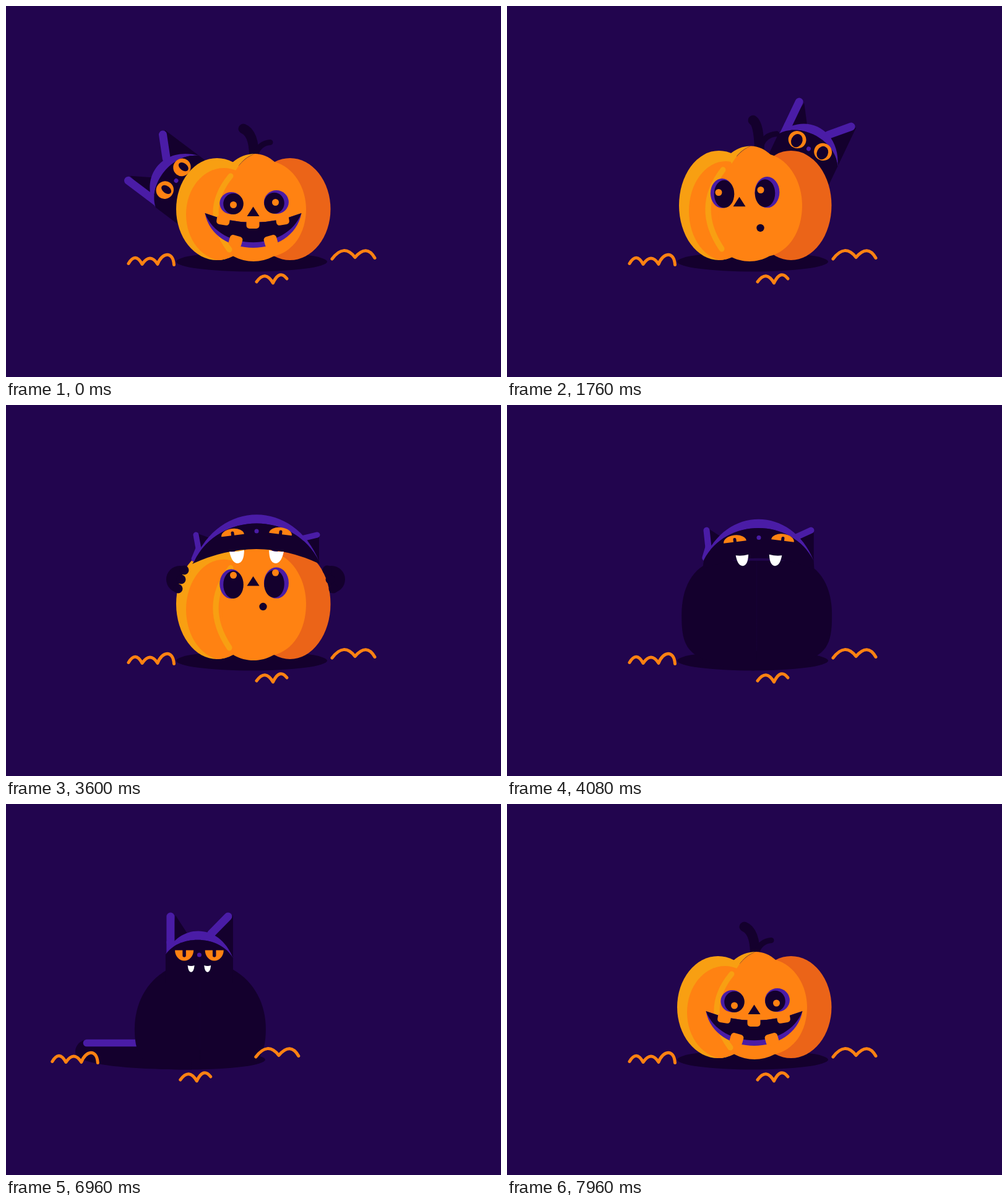
An HTML page with a canvas for the animation above (8 s loop, 800 px wide and 600 px high).

```html
<!DOCTYPE html>
<html lang="en">
<head>
<meta charset="utf-8">
<title>Pumpkin and cat</title>
<style>
html, body { margin: 0; width: 100%; height: 100%; overflow: hidden; background: #22054e; }
canvas { display: block; width: 800px; height: 600px; }
</style>
</head>
<body>
<canvas id="stage" width="800" height="600"></canvas>
<script>
const c = document.getElementById('stage').getContext('2d');
const BG = '#22054e', DARK = '#14002d', PURPLE = '#4a1ca6',
      ORANGE = '#ff8212', YELLOW = '#f89f12', RUST = '#eb6418';
const LOOP = 8000;

// ---------- helpers ----------
const lerp = (a, b, k) => a + (b - a) * k;
const clamp = v => Math.max(0, Math.min(1, v));
const smooth = v => v * v * (3 - 2 * v);

// keys: [time, value]
function track(t, ...keys) {
  if (t <= keys[0][0]) return keys[0][1];
  for (let i = 1; i < keys.length; i++) {
    const [t0, a] = keys[i - 1], [t1, b] = keys[i];
    if (t <= t1) return lerp(a, b, smooth((t - t0) / (t1 - t0)));
  }
  return keys[keys.length - 1][1];
}

// Slow start, long soft stop: cubic-bezier(.778, 0, .337, 1)
function glide(x) {
  let lo = 0, hi = 1;
  for (let i = 0; i < 24; i++) {
    const v = (lo + hi) / 2, w = 1 - v;
    if (3 * v * w * w * 0.778 + 3 * v * v * w * 0.337 + v * v * v < x) lo = v; else hi = v;
  }
  return smooth(lo);
}

function fill(color, d) { c.fillStyle = color; c.fill(new Path2D(d)); }
function line(color, width, d) {
  c.strokeStyle = color; c.lineWidth = width; c.lineCap = c.lineJoin = 'round';
  c.stroke(new Path2D(d));
}
function oval(color, x, y, rx, ry = rx, from = 0, to = 2 * Math.PI) {
  c.fillStyle = color;
  c.beginPath(); c.ellipse(x, y, rx, ry, 0, from, to); c.fill();
}
function at(x, y, rot, draw) {
  c.save(); c.translate(x, y); c.rotate(rot); draw(); c.restore();
}

// ---------- ground ----------
function shadow() { oval(DARK, 397, 413.5, 122, 16); }

function squiggles(dx) {
  at(dx, -0.5, 0, () => {
    line(ORANGE, 5, 'M198 417Q209 398 220 418Q233 399 245 418C252 399 270 396 271.5 419');
    line(ORANGE, 5, 'M405 446.5Q419 427 431.5 448.5Q442 426 454 441.5');
    line(ORANGE, 5, 'M527 409.5Q546 384 564 407Q583 385 596 408');
  });
}

// ---------- pumpkin ----------
function tooth(x, y, rot, w, h) {
  at(x, y, rot, () => {
    c.fillStyle = ORANGE;
    c.beginPath(); c.roundRect(-w / 2, -h / 2, w, h, 5); c.fill();
  });
}

function mouth(x, y, s) {
  if (s < 0.14) return oval(DARK, x, y, 6.2);
  at(x, y, 0, () => {
    c.scale(s, s);
    fill(PURPLE, 'M-78-27Q0 3 78-27C64 47.5-64 47.5-78-27Z');
    fill(DARK, 'M-78-27Q0 3 78-27C54 36-54 36-78-27Z');
    for (const i of [-1, 0, 1]) {
      tooth(48 * i - 0.5, -9.5 - 6 * i * i, -0.16 * i, 21, 15);
      if (i) tooth(28.5 * i, 18.5, -0.28 * i, 21, 18);
    }
  });
}

// lift raises the face, turn is -1 (left) to 1 (right), fear swaps smile for gasp
function pumpkin({ lift, turn, fear, look }, stem = true) {
  const h = 165 + 14 * (1 - Math.exp(-lift / 8));
  if (stem) {
    const sx = -14 * turn, sy = -0.8 * (h - 165) - 4 * Math.abs(turn), b = 402 + sx / 2;
    line(DARK, 16, `M${383.5 + sx} ${198.5 + sy}Q${b} ${206 + sy} ${b - 1} 250`);
    line(DARK, 9, `M${b + 1} ${242 + sy}Q${b + 6} ${222 + sy} ${427 + sx * 0.65} ${220.5 + sy}`);
  }
  c.save();
  c.translate(0, 411); c.scale(1, h / 165); c.translate(0, -411);
  const inL = 1.5 * Math.max(0, -turn), inR = 1.5 * Math.max(0, turn);
  oval(RUST, 459 - inR, 328.5, 65.5 - inR, 82.5);
  oval(YELLOW, 341 + inL, 328.5, 66 - inL, 82.5);
  c.save();
  c.clip();
  oval(ORANGE, 352 + inL, 337, 61 - inL, 75);
  c.restore();
  at(turn * 8, 0, 0, () => {
    fill(ORANGE, 'M371 266Q383 246 402 239C414 239 425 244 434 252C466 261 485 295 485 328' +
      'C485 368 464 398 432 405C412 415.500 388 415.500 368 405C342 385 345 300 371 266Z');
    fill(YELLOW, 'M366 253Q382 239 402 239Q383 245 371 266Z');
  });
  at(turn * 14, 0, 0, () => line(YELLOW, 9, 'M363 275Q316 332 361 394'));
  c.restore();

  const ex = 400.5 + 16.5 * turn, ey = 318 - lift, er = 18.5 + 6 * fear;
  for (const s of [-1, 1]) {
    oval(PURPLE, ex + s * 36.4, ey - s * 0.8, 19.4 + s * 0.6, er + s * 0.6);
    oval(DARK, ex + s * 33, ey + 1.4 - s * 0.6, 16.3, er * 0.92);
    oval(ORANGE, ex + 1 + 9 * turn + s * 34, ey + look - s * 2, 5.5);
  }
  const nx = 399.5 + 24 * turn, ny = 332 - lift * (0.25 + 0.046 * lift);
  fill(DARK, `M${nx} ${ny - 7.5}l10 15.500h-20Z`);
  mouth(399.5 + fear * (16 + 6 * turn), lerp(362 - 0.4 * lift, 398 - 2.44 * lift, fear), 1 - fear);
}

const mood = t => ({
  lift: track(t, [120, 0], [480, 16], [2800, 16], [3080, 29.5], [5000, 29.5], [5100, 12], [7400, 12], [7760, 0]),
  turn: track(t, [120, 0], [480, -1], [1880, -1], [2200, 1], [2800, 1], [3080, 0]),
  fear: track(t, [120, 0], [480, 1], [5000, 1], [5100, 0]),
  look: track(t, [120, 1.5], [480, -2.5], [2800, -2.5], [3080, -15.3], [5000, -15], [5100, -9], [7400, -9], [7760, 6])
});

// ---------- cat ----------
function eyes(mode, pupil) {
  for (const s of [-1, 1]) {
    if (mode === 'round') {
      const [dx, dy, rx, ry] = pupil;
      oval(ORANGE, s * 23, -5.5, 14.5, 14);
      oval(DARK, s * 23 + dx, -5.5 + dy, rx, ry);
    } else if (mode === 'half') {
      oval(ORANGE, s * 24.3, -7.5, 15, 17, 0, Math.PI);
      line(DARK, 5.5, `M${s * 24.3} -9V1`);
    } else {
      at(s * 38.5, 6 - s, s * 0.12, () => {
        oval(ORANGE, 0, 0, 18.5, 11, Math.PI, 2 * Math.PI);
        line(DARK, 5, 'M0 -4V1');
      });
    }
  }
}

// k: 0 upright head, 1 stretched wide over the pumpkin; origin at the nose
function head(x, y, rot, { k = 0, neck = 45, mode = 'round', pupil, fangs = false, flick = 0 }) {
  const w = lerp(54.5, 101, k), low = lerp(2.5, 49, k), tilt = 3 * (1 - k);
  const L = `${-w} ${low - tilt}`, R = `${w} ${low + tilt}`, cx = 0.6 * w;
  const ear = s => {
    const tx = s * lerp(46.5, 98, k), ty = lerp(-62, 6, k);
    const inner = `${s * lerp(19, 73, k)} ${lerp(-34, 12, k)}`;
    const outer = `${s * (w - 8 * (1 - k))} ${low - 4}`;
    const bend = `${s * lerp(46.5, 94, k)} ${lerp(-20, 28, k)}`;
    const edge = s < 0 ? bend : R;
    fill(DARK, `M${tx + lerp(8, 3, k)} ${ty - 2}L${inner}L${edge}Z`);
    line(PURPLE, lerp(13, 9, k), `M${tx} ${ty}L${s < 0 ? bend : inner}`);
    return `M${bend}L${outer}`;
  };
  at(x, y, rot, () => {
    c.save();
    c.translate(-46, -20); c.rotate(flick); c.translate(46, 20);
    const root = ear(-1);
    c.restore();
    line(PURPLE, lerp(13, 9, k), root);
    ear(1);
    fill(PURPLE, `M${L}C${-cx} -52 ${cx} -52 ${R}C${cx} -33 ${-cx} -33 ${L}Z`);
    const jaw = lerp(neck, 53, k);
    fill(DARK, `M${L}C${-cx} -33 ${cx} -33 ${R}L${w + k} ${jaw}Q0 ${lerp(neck, 5, k)} ${-w - 3 * k} ${jaw}Z`);
    eyes(mode, pupil);
    oval(PURPLE, 0, 0, 3.5);
    if (!fangs) return;
    const fw = lerp(5.5, 12, k), fh = lerp(11, 20, k);
    for (const s of [-1, 1]) {
      at(s * lerp(13.3, 32, k), lerp(17, 32, k), s * 0.1 * k, () =>
        fill('#fff', `M${-fw} 0Q0 2 ${fw} 0Q${fw * 0.8} ${fh} 0 ${fh}Q${-fw * 0.8} ${fh} ${-fw} 0Z`));
    }
  });
}

// d: how far the head has sunk back behind the pumpkin
function peek(x, y, deg, d, pupil) {
  if (d > 114) return;
  const r = deg * Math.PI / 180;
  head(x - Math.sin(r) * d, y + Math.cos(r) * d, r, { neck: 75, pupil });
}

// k: 1 as wide as the pumpkin inside, 0 sitting
function body(k, wobble) {
  const b = lerp(106, 127, k) * (1 + wobble), n = lerp(53.5, 70, k),
        top = lerp(268, 246, k), mid = lerp(364, 330, k);
  const half = s => `M0 ${top}H${s * n}C${s * lerp(88, 112, k)} ${top + lerp(20, 4, k)} ${s * b} ${mid - 40} ${s * b} ${mid}` +
    `C${s * b} ${mid + lerp(24, 45, k)} ${s * (b - 4)} 404 ${s * lerp(b - 15, 62, k)} 414H0Z`;
  at(lerp(414, 400, k), 0, 0, () => { fill(DARK, half(-1)); fill(DARK, half(1)); });
}

function tail(k) {
  if (k <= 0) return;
  const x = lerp(312, 212.5, k);
  fill(DARK, `M400 381H${x + 20}C${x + 3} 382 ${x - 2} 396 ${x} 404` +
    `C${x + 6} 421 ${x + 80} 429.500 400 429.500Z`);
  line(PURPLE, 11.5, `M${x + 18} 386.600H330`);
}

function paws(t, front) {
  const out = track(t, [2880, 0], [3120, 1], [3960, 1], [4080, 0]);
  if (out <= 0) return;
  const dx = track(t, [3600, 0], [3800, 15], [4040, -28]);
  const y = track(t, [3600, 282], [4040, 385]);
  for (const s of [-1, 1]) {
    const x = 403.5 + s * (122.5 + dx - (1 - out) * 40);
    if (!front) oval(DARK, x, y, 22);
    else for (const i of [-1, 0, 1]) oval(DARK, x - s * (2 - 5 * i), y + 15 * i, 7.5 * out);
  }
}

// ---------- scenes ----------
function hideAndSeek(t) {
  const jaw = track(t, [3320, 0], [3540, 1]);
  const rise = track(t, [2740, 320], [3020, 170], [3120, 173], [3320, 173], [3540, 204]);
  shadow();
  if (t < 1040) {
    peek(275, 282.5, -53, track(t, [0, 0], [200, -6], [480, 0], [840, 0], [1050, 116]), [2, 1.5, 5.8, 9]);
  } else if (t > 1300 && t < 2440) {
    peek(487.5, 231, 25.5, track(t, [1300, 116], [1560, -6], [1740, 0], [2200, 0], [2440, 116]), [0, 1.8, 9, 11]);
  }
  if (t > 2740 && jaw === 0) head(405, rise, 0, { neck: 100, pupil: [0, 2, 7, 10] });
  if (jaw > 0 && jaw < 1) { c.fillStyle = DARK; c.fillRect(352, rise + 10, 107, 255 - rise); }
  paws(t, false);
  pumpkin(mood(t), jaw < 0.4);
  if (jaw > 0) {
    head(405, rise, 0, { k: jaw, mode: jaw > 0.5 ? 'bite' : 'round', pupil: [0, 2, 7, 10], fangs: jaw > 0.3 });
  }
  paws(t, true);
}

function swallow(t) {
  const k = track(t, [3960, 1], [4320, 0]);
  const edge = track(t, [3600, 233], [4020, 425]);
  const gulping = t < 4040;
  shadow();
  paws(t, false);
  if (gulping) pumpkin(mood(t), false);
  tail(track(t, [4040, 0], [4400, 1]));
  c.save();
  if (gulping) {
    c.clip(new Path2D(`M200 150V${edge + 32}Q403 ${edge - 32} 606 ${edge + 32}V150Z`));
  }
  const fade = clamp((4600 - t) / 360);
  body(k, t > 4240 ? Math.sin((t - 4240) / 120 * Math.PI) * 0.014 * fade : 0);
  c.restore();
  const beat = t < 5560 ? t - 4940 : t - 5660;
  const flick = -0.27 * track(beat, [0, 0], [180, 1], [270, 1], [520, 0]);
  head(lerp(412.5, 405, k), lerp(244, 204, k), 0,
    { k, mode: k > 0.5 ? 'bite' : 'half', fangs: true, flick });
  paws(t, true);
}

function frame(t) {
  c.fillStyle = BG;
  c.fillRect(0, 0, 800, 600);
  const p = glide(clamp((t - 6384) / 1482));
  if (t < 3600) hideAndSeek(t);
  else if (p < 0.999) at(-650 * p, 0, 0, () => swallow(t));
  if (p > 0) {
    const near = glide(clamp((t - 6384) / 1457));
    at(650 * (1 - near), 0, 0, () => { shadow(); pumpkin(mood(t)); });
    squiggles(800 * (1 - p));
  }
  if (p < 0.999) squiggles(-800 * p);
}

const start = performance.now();
function tick() {
  frame((performance.now() - start) % LOOP);
  requestAnimationFrame(tick);
}
tick();
</script>
</body>
</html>
```
